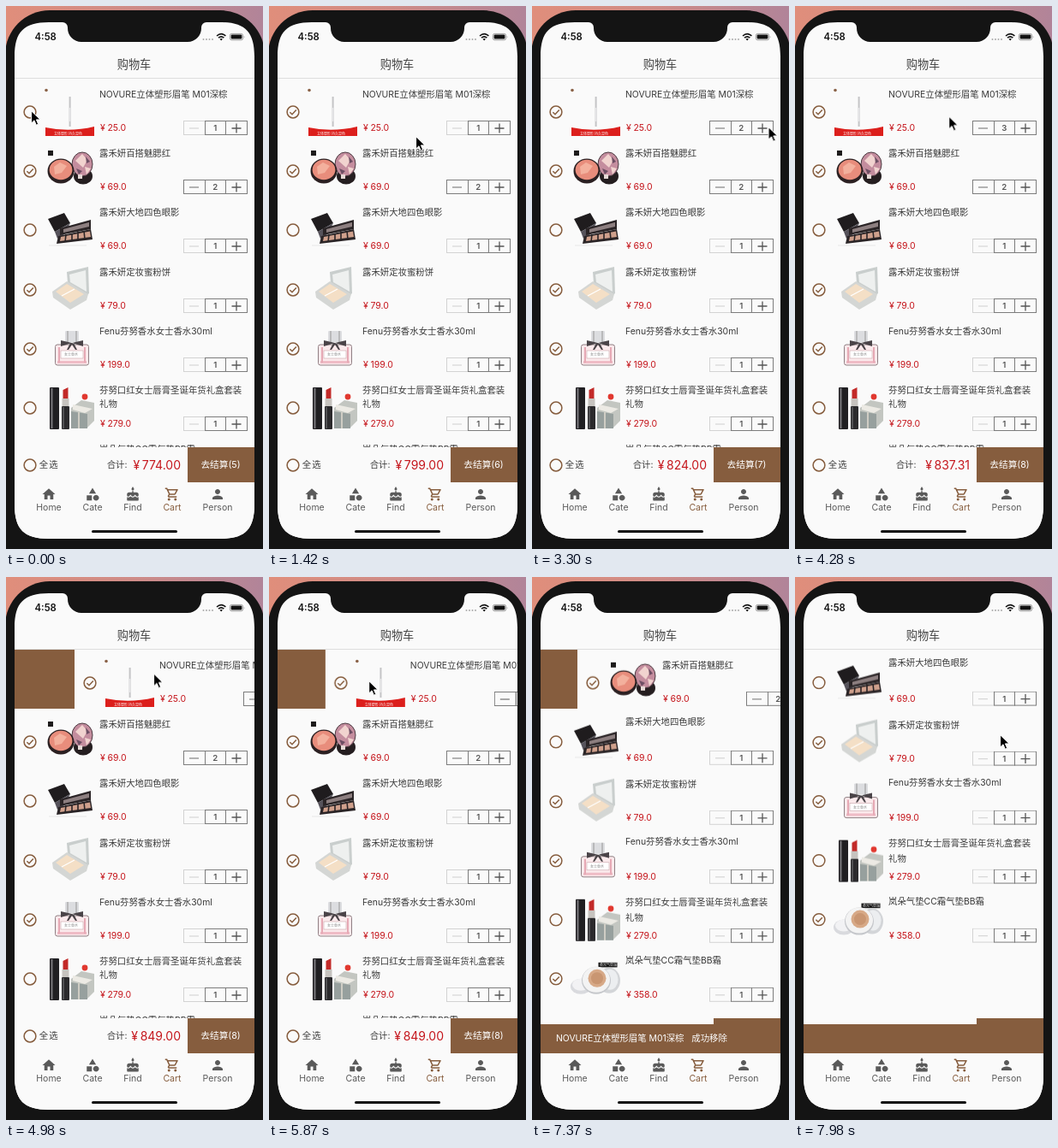
Animation, 300 px wide and 635 px high, one loop 8000 ms. Source, as an HTML page:

```html
<!DOCTYPE html>
<html lang="zh-CN">
<head>
<meta charset="utf-8">
<title>购物车</title>
<style>
:root { --brown: #865d3e; --red: #c5161c; --row: 69.2px; }
html, body { margin: 0; width: 100%; height: 100%; overflow: hidden; }
body {
  position: relative;
  background: linear-gradient(90deg, #e08e7b, #cf8c88 50%, #b18499);
  font: 10.4px/14px Inter, "Noto Sans CJK SC", "Noto Sans CJK", sans-serif;
  color: #3a3a3a;
}
div, svg { position: absolute; }
div { white-space: pre; }
.phone { left: -1.5px; top: 5px; width: 303px; height: 700px; border-radius: 52px; background: #141414; }
.screen {
  left: 0; top: 0; width: 300px; height: 635px; background: #fafafa;
  clip-path: path("M10 59C10 30 21 19 50 19H66A6 6 0 0 1 72 25V26A16 16 0 0 0 88 42H212A16 16 0 0 0 228 26V25A6 6 0 0 1 234 19H250C279 19 290 30 290 59V583C290 612 279 623 250 623H50C21 623 10 612 10 583Z");
}
.time { left: 33.5px; top: 29px; font-size: 11.3px; font-weight: 600; color: #111; }
.head { left: 0; width: 299px; top: 61px; text-align: center; font-size: 13.2px; color: #444; }
.rule { left: 10px; width: 280px; top: 84px; height: 1px; background: #dedede; }

.list { left: 10px; top: 85px; width: 280px; height: 430.5px; overflow: hidden; }
.rows { inset: 0; animation: lift 8s step-end infinite; }
.row { left: 0; width: 280px; height: var(--row); overflow: hidden; }
.slide { inset: 0; }
.slide::before {
  content: ""; position: absolute; right: 100%; top: 0;
  width: 280px; height: 100%; background: var(--brown);
}
.slide.first { animation: swipe1 8s linear infinite; }
.slide.second { animation: swipe2 8s linear infinite; }
.mark { left: 10.2px; top: 31px; width: 16px; height: 16px; }
.mark * { fill: none; stroke: var(--brown); stroke-width: 1.5; }
.late { animation: tick 8s step-end infinite; }
.pic { left: 34px; top: 10px; width: 60px; height: 60px; animation: load 8s linear infinite; }
.name { left: 99px; top: 12px; animation: nudge 8s step-end infinite; }
.name.more { top: 27.5px; }
.price { left: 100px; top: 51px; font-size: 10.5px; color: var(--red); }
.price i, .total i { font-style: normal; margin-right: 2.6px; }
.qty { left: 197px; top: 49px; width: 76px; height: 18px; fill: none; stroke: #7c7c7c; }
.qty .sign { stroke: #555; stroke-width: 1.3; }
.minus { opacity: .3; }
.minus .sign { stroke: #8c8c8c; }
.on .minus { opacity: 1; }
.qty text { fill: #555; stroke: none; font-size: 9.6px; font-weight: 600; text-anchor: middle; }

.bar { left: 10px; top: 516px; width: 280px; height: 41px; background: #fafafa; }
.bar .mark { top: 13px; }
.all { left: 28.8px; top: 14px; letter-spacing: 1px; }
.sum { left: 107.7px; top: 14px; }
.total { right: 86px; top: 14px; font-size: 14px; color: var(--red); }
.pay { left: 202px; top: 0; width: 77px; height: 41px; padding-right: 1px; line-height: 41px; text-align: center; font-size: 10.7px; background: var(--brown); color: #fff; }

.toast { left: 10px; top: 523px; width: 280px; height: 34px; overflow: hidden; }
.sheet { inset: 0; background: var(--brown); transform: translateY(34px); animation: rise 8s linear infinite; }
.msg { left: 18px; top: 10px; color: #fff; opacity: 0; animation: msg 8s linear infinite; }

.tabs { left: 0; top: 557px; width: 300px; height: 78px; background: #fafafa; }
.tab { width: 60px; top: 5px; height: 34px; margin-left: -30px; text-align: center; line-height: 50px; font-size: 10.5px; color: #5a5a5a; }
.tab svg { left: 21px; top: 0; width: 18px; height: 18px; fill: currentColor; }
.tab.now { color: var(--brown); }
.home { left: 100px; top: 612.6px; width: 100px; height: 3.4px; border-radius: 2px; background: #111; }
.cursor { left: 0; top: 0; width: 13px; height: 19px; animation: roam 8s linear infinite; }

@keyframes lift {
  0% { transform: none; }
  79.875% { transform: translateY(calc(-1 * var(--row))); }
  98.6%, 100% { transform: translateY(calc(-2 * var(--row))); }
}
@keyframes swipe1 {
  0%, 57.7% { transform: none; }
  57.75% { transform: none; animation-timing-function: steps(4, jump-both); }
  62.25%, 63.375% { transform: translateX(70px); }
  64.5%, 72.25% { transform: none; }
  75% { transform: translateX(135px); }
  77.6%, 100% { transform: translateX(280px); }
}
@keyframes swipe2 {
  0%, 89.8% { transform: none; }
  92.125%, 93.125% { transform: translateX(43px); }
  95.2% { transform: translateX(150px); }
  96.8%, 100% { transform: translateX(280px); }
}
@keyframes tick { 0% { opacity: 0; } 4.5%, 100% { opacity: 1; } }
@keyframes load {
  0%, 79.87% { opacity: 1; }
  79.875%, 81.5% { opacity: 0; }
  87%, 100% { opacity: 1; }
}
@keyframes nudge { 0% { transform: none; } 79.875%, 100% { transform: translateY(var(--d, 0)); } }
@keyframes rise {
  0%, 79.87% { transform: translateY(34px); }
  79.875%, 81% { transform: translateY(20px); }
  82.2%, 100% { transform: none; }
}
@keyframes msg {
  0%, 81% { opacity: 0; }
  82.6%, 98.5% { opacity: 1; }
  99.5%, 100% { opacity: 0; }
}
@keyframes roam {
  0%, 10% { transform: translate(29px, 122px); opacity: 1; }
  14.5% { transform: translate(101px, 138px); }
  17.75%, 18.7% { transform: translate(171px, 152px); }
  23.9%, 49.5% { transform: translate(275.5px, 141px); }
  56.6%, 57.75% { transform: translate(105px, 119px); }
  62.25%, 66.7% { transform: translate(172px, 112.5px); }
  70%, 72.25% { transform: translate(84px, 121px); }
  77.6%, 79.87% { transform: translate(235px, 121px); opacity: 1; }
  79.875%, 95.9% { transform: translate(238px, 125px); opacity: 0; }
  96% { transform: translate(238px, 130px); opacity: 1; }
  99.7%, 100% { transform: translate(239px, 184px); opacity: 1; }
}
</style>
</head>
<body>
<div class="phone"></div>
<div class="screen">
  <div class="time">4:58</div>
  <svg style="left:226px;top:28px" width="56" height="16">
    <g fill="#aaa"><circle cx="4.5" cy="11" r="1"/><circle cx="8" cy="11" r="1"/><circle cx="11.5" cy="11" r="1"/><circle cx="15" cy="11" r="1"/></g>
    <g fill="none" stroke="#111" stroke-width="1.6"><path d="M20 7Q25.2 2.4 30.4 7M22 9.2Q25.2 6.4 28.4 9.2"/></g>
    <path d="M23.5 10.6Q25.2 9.2 26.9 10.6L25.2 12.4Z" fill="#111"/>
    <rect x="35.4" y="4.4" width="15.2" height="7.4" rx="2" fill="none" stroke="#888" stroke-width=".8"/>
    <rect x="36.6" y="5.6" width="12.8" height="5" rx="1" fill="#111"/>
    <path d="M51.8 6.7q1.4 1.4 0 2.8z" fill="#888"/>
  </svg>
  <div class="head">购物车</div>
  <div class="rule"></div>
  <div class="list"><div class="rows"></div></div>
  <div class="bar">
    <svg class="mark" viewBox="0 0 16 16"><circle cx="8" cy="8" r="6.9"/></svg>
    <div class="all">全选</div>
    <div class="sum">合计:</div>
    <div class="total"><i>¥</i><span class="amount"></span></div>
    <div class="pay"></div>
  </div>
  <div class="toast"><div class="sheet"><div class="msg">NOVURE立体塑形眉笔 M01深棕   成功移除</div></div></div>
  <div class="tabs"></div>
  <div class="home"></div>
</div>
<svg class="cursor" viewBox="0 0 13 19"><path d="M.6.8V15L4 11.8L6.3 17.2L8.7 16.2L6.4 10.9H11Z" fill="#000" stroke="#fff" stroke-width="1"/></svg>

<script>
const $ = s => document.querySelector(s);

const pics = {
  pencil: `<circle cx="3" cy="3.5" r="1.8" fill="#8a6248"/>
    <path d="M30.6 11V46" stroke="#c4c4c6" stroke-width="2"/><path d="M30.6 24V40" stroke="#e6e6e8" stroke-width="1.4"/>
    <path d="M2 47Q30 53 59 46V57H2Z" fill="#dc1f1c"/>
    <text x="12" y="55.6" font-size="4" fill="#fff">立体塑形 持久显色</text>`,
  blush: `<rect x="5" y="5" width="6" height="6" fill="#1d1b1b"/>
    <ellipse cx="46" cy="35" rx="11" ry="9.5" fill="#251e20"/><ellipse cx="45" cy="21" rx="12" ry="14" fill="#c48d9e" stroke="#4a3a40"/>
    <path d="M37 17l8-8 6 7-5 9zM48 24l7 2-5 7z" fill="#f1d3cf"/><path d="M38 26l7 3-4 4zM49 12l5 6-4 2z" fill="#6d4e63"/>
    <ellipse cx="20" cy="29" rx="15.5" ry="14.5" fill="#2b2022"/><ellipse cx="20" cy="27.5" rx="13.4" ry="11.8" fill="#e88d7c"/>
    <path d="M12 24l7-5 8 4-6 8-8 2z" fill="#f3b09d"/><rect x="40" y="33" width="5" height="5" fill="#e6d9d6"/>`,
  palette: `<path d="M5 16L24 9L31 21L13 31Z" fill="#1f1c1e"/><path d="M13 31L31 21L24 34L16 39Z" fill="#55525a"/>
    <path d="M19 27L55 17V28L19 35Z" fill="#2a2426"/><path d="M23 28L53 20V25L23 32Z" fill="#8d7f80"/>
    <path d="M17 36L55 28L57 40L15 45Z" fill="#2a2426"/><path d="M20 37L54 30.5L55 37L19 42Z" fill="#cfa08c"/>
    <path d="M26 34L25 43M33 33V42M40 31V41M47 30L48 40" stroke="#2a2426" stroke-width="1.6"/><path d="M6 47H50" stroke="#e8e8e8"/>`,
  powder: `<path d="M27 8L52 2L53 33L48 37L28 21Z" fill="#c9cecd"/><path d="M30 11L49 6L50 31L31 20Z" fill="#eef0ef"/>
    <path d="M10 31L27 19L52 34L50 41L31 52L11 38Z" fill="#d4d6d4"/><path d="M14 31L27 22L47 34L31 44Z" fill="#f4dfc6"/>
    <path d="M21 36L36 28" stroke="#fff" stroke-width="1.2"/>`,
  perfume: `<rect x="25" y="8" width="16" height="13" rx="1" fill="#dcdde0"/><path d="M28 8V21M38 8V21" stroke="#aaa" stroke-width="1.4"/>
    <rect x="13.5" y="24" width="39" height="24" rx="2.5" fill="#fbeaec" stroke="#8f8084"/><path d="M16 43H50V46H16Z" fill="#efbcc6"/>
    <path d="M18 27V45M48 27V45" stroke="#e6a9b5" stroke-width="2"/>
    <path d="M33 22L20 19V26ZM33 22L46 19V26ZM31 22L27 30H29L33 24L37 30H39L35 22Z" fill="#4a4448"/>
    <rect x="20" y="31" width="26" height="9" fill="#fff" stroke="#c9a3a9" stroke-width=".6"/><text x="24" y="37" font-size="4" fill="#888">女士香水</text>`,
  lips: `<rect x="7" y="5" width="11" height="49" rx="1" fill="#201f22"/><path d="M9.5 6V53" stroke="#77767a" stroke-width="2"/>
    <path d="M22.5 18V8L28.5 5V18Z" fill="#c22a28"/><rect x="21.5" y="18" width="8" height="9" fill="#c6c3bf"/>
    <rect x="21" y="27" width="9" height="27" rx="1" fill="#2b2a2d"/><path d="M23 28V53" stroke="#77767a"/>
    <path d="M32 29L44 20L59 23V44L50 53H32Z" fill="#c3c6c1"/><path d="M32 33L51 36V53H32Z" fill="#97a09e"/><path d="M34 25L57 30L48 35L34 31Z" fill="#eceae4"/>
    <path d="M41 34V53" stroke="#ddd8cd" stroke-width="1.6"/><circle cx="48" cy="16" r="3.4" fill="#e1382f"/>`,
  cushion: `<rect x="33.5" y="10" width="22" height="5.6" fill="#171717"/><text x="35" y="14.4" font-size="4" fill="#ddd">柔光气垫霜</text>
    <ellipse cx="46" cy="31" rx="13" ry="15" fill="#d3d5d8"/><ellipse cx="47" cy="30" rx="9.5" ry="12" fill="#eceef0"/>
    <ellipse cx="13" cy="38" rx="12" ry="9" fill="#d9dade"/><ellipse cx="13" cy="36" rx="10" ry="7" fill="#f2f2f4"/>
    <ellipse cx="31" cy="31" rx="17" ry="16" fill="#c5c7cb"/><ellipse cx="31" cy="30" rx="16" ry="15" fill="#f3f3f3"/>
    <circle cx="32" cy="28.5" r="10.5" fill="#d7a987"/><circle cx="32" cy="28.5" r="7" fill="#c99672"/>`
};

// name, price, quantity, checked, picture, title nudge after reload, second line
const items = [
  ["NOVURE立体塑形眉笔 M01深棕", 25, 1, 1, "pencil", 0],
  ["露禾妍百搭魅腮红", 69, 2, 1, "blush", 0],
  ["露禾妍大地四色眼影", 69, 1, 0, "palette", -2.5],
  ["露禾妍定妆蜜粉饼", 79, 1, 1, "powder", 0],
  ["Fenu芬努香水女士香水30ml", 199, 1, 1, "perfume", -1.5],
  ["芬努口红女士唇膏圣诞年货礼盒套装", 279, 1, 0, "lips", 0, "礼物"],
  ["岚朵气垫CC霜气垫BB霜", 358, 1, 1, "cushion", -.5]
];

const stepper = n => `<svg class="qty ${n > 1 ? "on" : ""}" viewBox="0 0 76 18">
  <g class="minus"><rect x=".5" y=".5" width="25" height="16"/><path class="sign" d="M7 9H18"/></g>
  <rect x="25.5" y=".5" width="24" height="16"/><rect x="49.5" y=".5" width="25" height="16"/>
  <path class="sign" d="M56.5 9H67.5M62 3.5V14.5"/><text x="37.3" y="12">${n}</text></svg>`;

$(".rows").innerHTML = items.map(([name, price, n, checked, pic, d, more], i) => `
  <div class="row" style="top:${i * 69.2}px"><div class="slide ${["first", "second"][i] || ""}">
    <svg class="mark" viewBox="0 0 16 16"><circle cx="8" cy="8" r="6.9"/>${
      checked ? `<path class="${i ? "" : "late"}" d="M4.4 8.2L7 10.7L11.8 5.6"/>` : ""}</svg>
    <svg class="pic" viewBox="0 0 60 60">${pics[pic]}</svg>
    <div class="name" style="--d:${d}px">${name}</div>
    ${more ? `<div class="name more" style="--d:2.5px">${more}</div>` : ""}
    <div class="price"><i>¥</i>${price.toFixed(1)}</div>
    ${stepper(n)}
  </div></div>`).join("");

const tabs = [
  ["Home", 50, "M10 20v-6h4v6h5v-8h3L12 3 2 12h3v8z"],
  ["Cate", 101, "M12 2l-5.5 9h11zM17.5 13a4.5 4.5 0 1 0 .01 0zM3 13.5h8v8H3z"],
  ["Find", 148, "M12 6c1.1 0 2-.9 2-2 0-.38-.1-.73-.29-1.03L12 0l-1.71 2.97C10.1 3.27 10 3.62 10 4c0 1.1.9 2 2 2zm4.6 10l-1.07-1.07L14.45 16c-1.3 1.3-3.58 1.3-4.89 0l-1.07-1.07L7.4 16c-.65.64-1.52 1-2.44 1-.73 0-1.4-.23-1.96-.61V21c0 .55.45 1 1 1h16c.55 0 1-.45 1-1v-4.61c-.56.38-1.23.61-1.96.61-.92 0-1.79-.36-2.44-1zM18 9h-5V7h-2v2H6c-1.66 0-3 1.34-3 3v1.54c0 1.08.88 1.96 1.96 1.96.52 0 1.02-.2 1.38-.57l2.14-2.13 2.13 2.13c.74.74 2.03.74 2.77 0l2.14-2.13 2.13 2.13c.37.37.86.57 1.38.57 1.08 0 1.96-.88 1.96-1.96V12c0-1.66-1.34-3-3-3z"],
  ["Cart", 194, "M15.55 13c.75 0 1.41-.41 1.75-1.03l3.58-6.49A1 1 0 0 0 20 4H5.21l-.94-2H1v2h2l3.6 7.59-1.35 2.44C4.52 15.37 5.48 17 7 17h12v-2H7l1.1-2zM6.16 6h12.15l-2.76 5H8.53zM7 18a2 2 0 1 0 .01 0zM17 18a2 2 0 1 0 .01 0z"],
  ["Person", 247, "M12 12c2.21 0 4-1.79 4-4s-1.79-4-4-4-4 1.79-4 4 1.79 4 4 4zm0 2c-2.67 0-8 1.34-8 4v2h16v-2c0-2.66-5.33-4-8-4z"]
];
$(".tabs").innerHTML = tabs.map(([label, x, d]) =>
  `<div class="tab ${label == "Cart" ? "now" : ""}" style="left:${x}px"><svg viewBox="0 0 24 24"><path fill-rule="evenodd" d="${d}"/></svg>${label}</div>`).join("");

// start time, total before and after, pieces in cart
const changes = [
  [0, 774, 774, 5],
  [360, 774, 799, 6],
  [2250, 799, 824, 7],
  [3750, 824, 849, 8],
  [6390, 849, 774, 5]
];
const amount = $(".amount"), pay = $(".pay"), qty = $(".qty"), num = $(".qty text");
const clock = $(".cursor").getAnimations()[0];

function put(el, text) {
  if (el.textContent !== text) el.textContent = text;
}

function draw() {
  const t = (clock.currentTime || 0) % 8000;
  const [at, from, to, pieces] = changes.findLast(c => t >= c[0]);
  // the total counts for one second, redrawn every 90 ms
  const p = Math.min(1, (Math.floor((t - at) / 90) * 90 + 82.5) / 1000);
  put(amount, (from + (to - from) * p).toFixed(2));
  put(pay, `去结算(${pieces})`);
  const n = t < 2250 ? 1 : t < 3750 ? 2 : 3;
  put(num, String(n));
  qty.classList.toggle("on", n > 1);
  requestAnimationFrame(draw);
}
draw();
</script>
</body>
</html>
```
